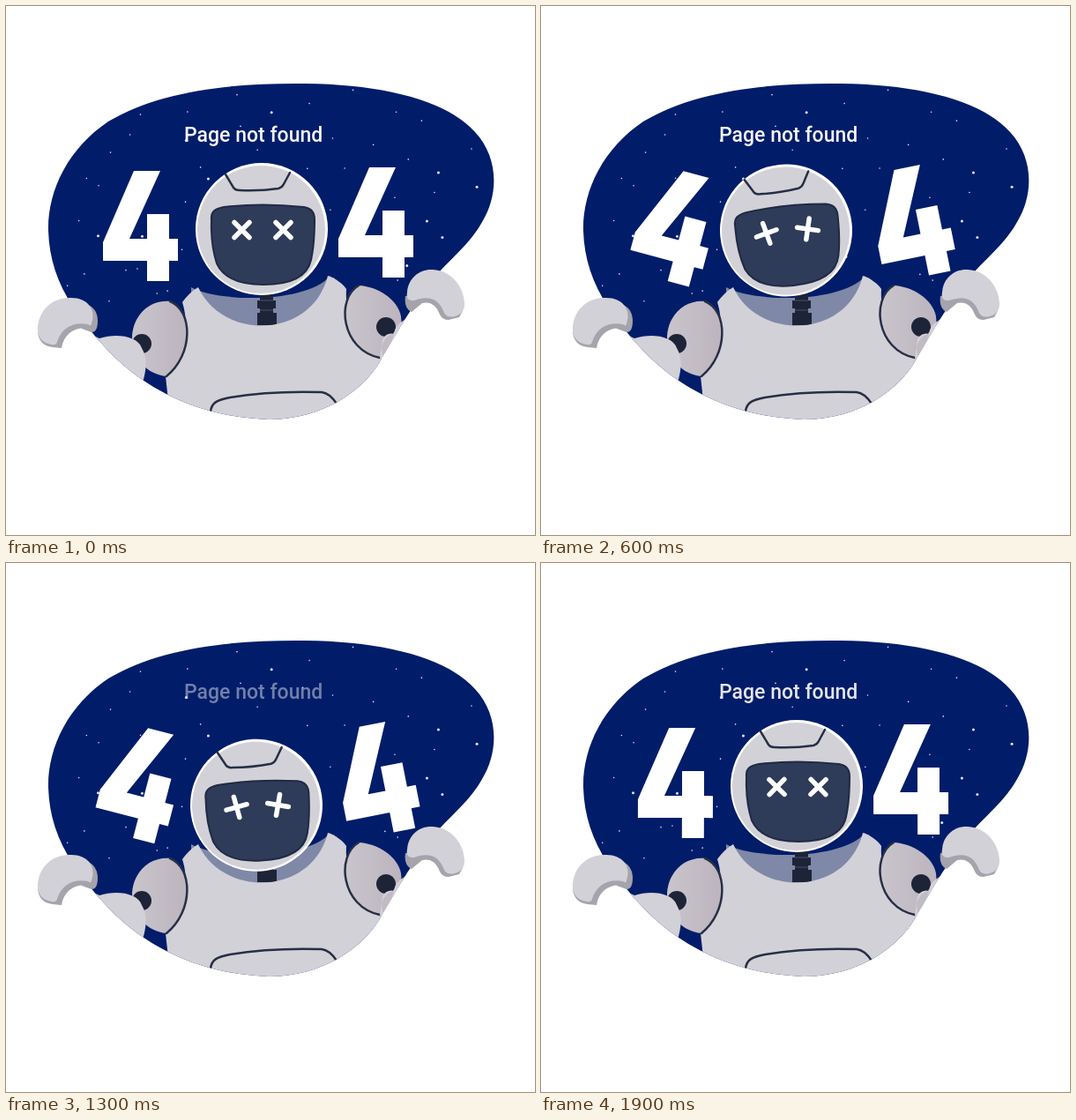
An HTML page for the animation above (2 s loop, 600 px wide and 600 px high).

```html
<!DOCTYPE html>
<html lang="en">
<head>
<meta charset="utf-8">
<title>Page not found</title>
<style>
  html, body { margin: 0; width: 100%; height: 100%; overflow: hidden; background: #fff; }
  svg { display: block; width: 100vw; height: 100vh; }
  .light { fill: #d3d1d8; }
  .shade { fill: #c1bbc4; }
  .rim { fill: #a5a3ab; }
  .dark { fill: #1d2438; }
  .line { fill: none; stroke: #272f45; stroke-width: 2.5; stroke-linecap: round; stroke-linejoin: round; }
  .eye { fill: none; stroke: #fff; stroke-width: 5.5; stroke-linecap: round; }
  text { font: 500 23px Roboto, sans-serif; fill: #f6f6f8; }
</style>
</head>
<body>
<svg viewBox="0 0 600 600">
  <defs>
    <clipPath id="inside">
      <path d="M48 255C47 210 70 162 116 131C176 95 262 87 340 88C428 89 500 107 532 143C559 172 559 214 540 245C524 274 500 288 478 318C454 351 443 371 427 398C407 437 358 469 298 469C232 467 176 444 134 408C112 389 92 365 76 341C58 314 49 286 48 255Z"/>
    </clipPath>
    <path id="four" d="M145 187H175L140 264H160V236H185V264H195V289H185V312H160V289H110V268Z" fill="#fff"/>
    <path id="cross" class="eye" d="M0-12V12M-12 0H12"/>
    <linearGradient id="shoulder">
      <stop stop-color="#c9c5cc"/><stop offset="1" stop-color="#bcb4be"/>
    </linearGradient>
  </defs>

  <g clip-path="url(#inside)">
    <rect width="600" height="600" fill="#011c69"/>
    <g id="stars" fill="#dfe5ff"></g>
    <text id="message" x="202" y="154">Page not found</text>
    <use id="leftFour" href="#four"/>
    <g id="rightFour"><use href="#four" x="267" y="-4"/></g>

    <path d="M210 319C240 336 340 338 368 306V370H210Z" fill="#7f88a6"/>
    <path class="dark" d="M288 326H303V334H306V343H303V348H307V362H285V348H288V343H285V334H288Z"/>
    <path d="M288 345H303M288 334H303" stroke="#46506c"/>
    <path class="light" d="M218 319C208 325 204 331 200 336C209 365 203 400 181 420L187 475H400L440 400C400 390 384 362 386 321C383 316 373 308 365 306C347 378 246 380 218 319Z"/>
    <path class="line" d="M232 460C233 450 239 447 254 444C290 438 328 437 358 438Q367 439 375 451"/>

    <path d="M186 335C212 345 213 395 182 420C161 418 143 401 143 374C145 349 164 333 186 335Z" fill="url(#shoulder)"/>
    <path class="line" d="M186 335C212 345 213 395 182 420"/>
    <circle class="dark" cx="154" cy="383" r="11"/>
    <path class="light" d="M80 365L106 377C125 371 149 374 154 388C161 400 159 414 155 427L110 400Z"/>

    <path d="M400 317C421 318 444 332 448 352C451 382 440 399 424 399C380 390 374 332 400 317Z" fill="url(#shoulder)"/>
    <path class="line" d="M400 317C374 332 380 390 424 399"/>
    <circle class="dark" cx="431" cy="364" r="11"/>
    <path class="light" d="M424 400L427 378Q432 370 440 372Q441 362 452 356L472 333L480 345L440 400Z"/>
    <path class="shade" d="M426 386Q430 373 440 372L436 385L427 397Z"/>
  </g>

  <path class="rim" d="M89 337Q104 342 104 357Q104 370 97 370L86 366Z"/>
  <path class="rim" d="M36 369Q37 385 53 387L63 388C66 370 81 362 97 367L96 355L55 360Z"/>
  <path class="light" d="M36 369C35 348 50 331 72 331C91 330 103 343 97 360Q97 364 93 361C76 358 63 365 58 381Q57 385 52 384Q38 382 36 369Z"/>
  <path class="rim" d="M453 329Q451 343 460 347L472 337Q486 334 492 350Q495 356 502 356L514 353L518 346L490 327Z"/>
  <path class="light" d="M455 325C456 308 470 298 484 299C505 300 519 318 520 337Q521 349 509 352Q500 354 497 348C491 332 480 328 463 334Q453 335 455 325Z"/>

  <g id="head">
    <circle cx="290" cy="253" r="75" fill="#fff"/>
    <circle class="light" cx="289.5" cy="253.5" r="72.5"/>
    <path class="line" d="M249 191L258 206Q260 209 265 209Q288 210 309 207Q313 206 315 202L322 189"/>
    <path d="M233 243C232 233 237 230 247 228Q290 223 338 228Q350 230 350 242Q350 270 346 288C342 306 325 316 292 316C262 316 246 307 239 292Q232 270 233 243Z" fill="#2e3b59" stroke="#202a42" stroke-width="2"/>
    <use id="leftEye" href="#cross"/>
    <use id="rightEye" href="#cross"/>
  </g>
</svg>
<script>
  const LOOP = 2000, STEP = 100;
  const el = id => document.getElementById(id);
  const setTransform = (id, value) => el(id).setAttribute('transform', value);

  let seed = 7;
  const random = () => (seed = seed * 16807 % 2147483647) / 2147483647;

  // One star at a random place in each cell of a loose grid.
  function scatterStars(cell) {
    for (let y = 90; y < 320; y += cell) {
      for (let x = 50; x < 550; x += cell) {
        const star = document.createElementNS('http://www.w3.org/2000/svg', 'circle');
        star.setAttribute('cx', x + random() * cell);
        star.setAttribute('cy', y + random() * cell);
        star.setAttribute('r', random() < 0.25 ? 1.5 : 0.8);
        el('stars').append(star);
      }
    }
  }

  const ramp = (t, from, to) => Math.min(1, Math.max(0, (t - from) / (to - from)));
  const ease = (t, from, to) => {
    const u = ramp(t, from, to);
    return u * u * (3 - 2 * u);
  };

  function draw(t) {
    const swing = ease(t, 50, 750) - ease(t, 1100, 1950);
    setTransform('leftFour', `rotate(${17 * swing} 152 250)`);
    setTransform('rightFour', `rotate(${-13 * swing} 421 242)`);

    // The head dips halfway between its two resting places.
    const turn = ease(t, 200, 600) - ease(t, 1100, 1500);
    const dip = 1.5 * turn + 21 * Math.sin(Math.PI * turn);
    setTransform('head', `translate(${-12 * turn} ${dip}) rotate(${-6 * turn} 290 253)`);

    const spin = 45 - 67 * swing;
    setTransform('leftEye', `translate(267.5 254) rotate(${spin})`);
    setTransform('rightEye', `translate(314.5 254) rotate(${-spin})`);

    el('message').setAttribute('opacity', 1 - 0.54 * ramp(t, 850, 1050) + 0.47 * ramp(t, 1550, 1800));
  }

  function tick() {
    const t = performance.now() % LOOP;
    draw(Math.floor(t / STEP) * STEP);
    requestAnimationFrame(tick);
  }

  scatterStars(44);
  tick();
</script>
</body>
</html>
```
